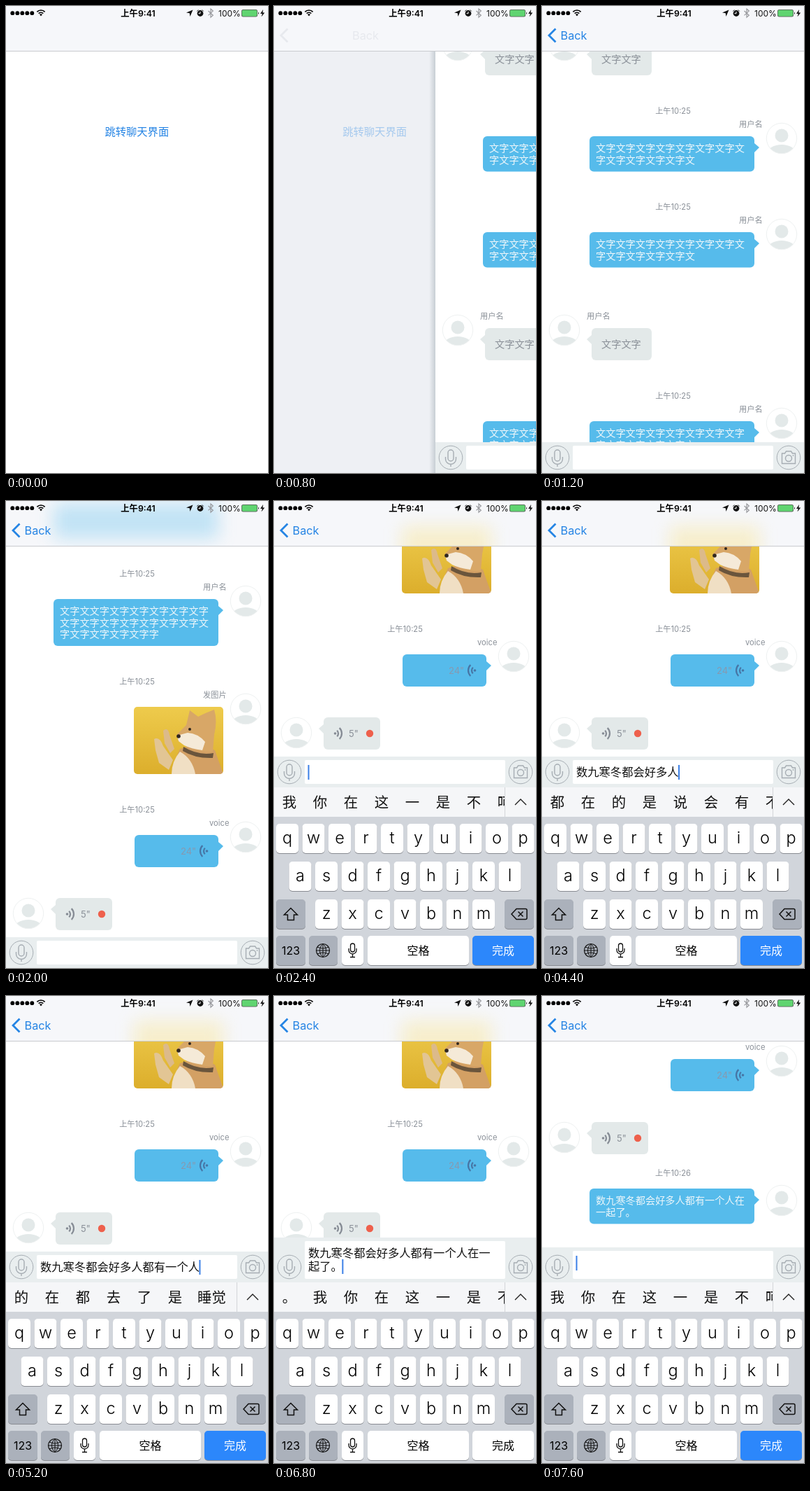
An HTML page with a canvas that plays this animation: 375x667 px, repeating every 8 s.

```html
<!DOCTYPE html>
<html lang="zh-CN">
<head>
<meta charset="utf-8">
<title>聊天界面</title>
<style>
html, body { margin: 0; width: 100%; height: 100%; overflow: hidden; background: #fff; }
canvas { display: block; width: 375px; height: 667px; }
</style>
</head>
<body>
<canvas id="stage"></canvas>
<script>
const W = 375, H = 667, NAV = 64, KEYBOARD_TOP = 409;
const STEP = 400, LOOP = 8000;
const FONT = 'Inter, "Noto Sans CJK SC", "Noto Sans CJK", sans-serif';
const BLUE = '#56bbeb', PALE = '#e3e9e9', GREY = '#8a9098', LINK = '#2584e4';

const canvas = document.getElementById('stage');
const ratio = window.devicePixelRatio || 1;
canvas.width = W * ratio;
canvas.height = H * ratio;
const c = canvas.getContext('2d');

// ---- drawing helpers ----
function scoped(draw) { c.save(); draw(); c.restore(); }

function rect(x, y, w, h, fill, r = 0) {
  c.fillStyle = fill;
  c.beginPath();
  c.roundRect(x, y, w, h, r);
  c.fill();
}

function clip(x, y, w, h, r = 0) {
  c.beginPath();
  c.roundRect(x, y, w, h, r);
  c.clip();
}

function dot(x, y, r, fill) {
  c.fillStyle = fill;
  c.beginPath();
  c.arc(x, y, r, 0, 7);
  c.fill();
}

function ring(x, y, r, color, width = 1) {
  c.strokeStyle = color;
  c.lineWidth = width;
  c.beginPath();
  c.arc(x, y, r, 0, 7);
  c.stroke();
}

function fillPath(d, color, x = 0, y = 0) {
  scoped(() => { c.translate(x, y); c.fillStyle = color; c.fill(new Path2D(d)); });
}

function strokePath(d, color, width, x = 0, y = 0) {
  scoped(() => {
    c.translate(x, y);
    c.strokeStyle = color;
    c.lineWidth = width;
    c.stroke(new Path2D(d));
  });
}

// y is the vertical middle of the line
function text(s, x, y, size, color, align = 'left', weight = 400) {
  c.font = `${weight} ${size}px ${FONT}`;
  c.textAlign = align;
  c.fillStyle = color;
  c.fillText(s, x, y + size * 0.37);
}

// ---- conversation ----
const TWO_LINES = ['文字文字文字文字文字文字文字文', '字文字文字文字文字文'];
const ROWS = [
  { y: 53, kind: 'them', name: '用户名' },
  { y: 186, kind: 'me', lines: TWO_LINES, name: '用户名' },
  { y: 323, kind: 'me', lines: TWO_LINES, name: '用户名' },
  { y: 460, kind: 'them', name: '用户名' },
  { y: 593, kind: 'me', lines: ['文文字文字文字文字文字文字文字', '字文字文字文字文字文'], name: '用户名' },
  { y: 730, kind: 'me', lines: ['文字文文字文字文字文字文字文字', '文字文字文字文字文字文字文字文', '字文字文字文字文字字'], name: '用户名' },
  { y: 884, kind: 'photo', name: '发图片' },
  { y: 1067, kind: 'myVoice', name: 'voice' },
  { y: 1157, kind: 'theirVoice' },
  { y: 1252, kind: 'me', lines: ['数九寒冬都会好多人都有一个人在', '一起了。'], sent: true }
];

function avatar(x, y) {
  scoped(() => {
    c.beginPath();
    c.arc(x, y, 22, 0, 7);
    c.clip();
    dot(x, y, 22, '#fff');
    dot(x, y - 4, 9.5, PALE);
    c.beginPath();
    c.ellipse(x, y + 21, 20, 12, 0, 0, 7);
    c.fill();
  });
  ring(x, y, 21.7, '#eef1f1');
}

function bubble(x, y, w, h, mine) {
  const color = mine ? BLUE : PALE;
  rect(x, y, w, h, color, 6);
  fillPath(mine ? 'M0 10L7 16 0 23z' : 'M0 10L-7 16 0 23z', color, mine ? x + w : x, y);
}

function soundWaves(x, y, direction, color) {
  scoped(() => {
    c.translate(x, y);
    c.scale(direction, 1);
    dot(1.5, 0, 1.8, color);
    c.strokeStyle = color;
    c.lineWidth = 2.2;
    for (const r of [6, 11]) {
      c.beginPath();
      c.arc(0, 0, r, -0.8, 0.8);
      c.stroke();
    }
  });
}

function dogPhoto(x, y) {
  scoped(() => {
    clip(x, y, 128, 96, 5);
    c.translate(x, y);
    const field = c.createLinearGradient(0, 0, 0, 96);
    field.addColorStop(0, '#eecb4c');
    field.addColorStop(1, '#dcae2c');
    rect(0, 0, 128, 96, field);
    fillPath('M66 60Q92 50 116 62L128 96H56Q58 76 66 60z', '#d3a064');
    fillPath('M66 64Q84 74 88 96H54Q54 78 66 64z', '#f0dfc4');
    fillPath('M42 34Q49 28 51 40L58 60 52 66 44 52z', '#dcba8a');
    fillPath('M29 46Q37 42 42 56L56 76 50 90 36 80 31 62z', '#e2c594');
    fillPath('M62 39L75 26 80 5 92 14Q104 8 115 4Q120 20 115 40L113 64Q92 66 73 55L64 49z', '#d8a767');
    fillPath('M62 41L77 37Q92 38 102 50L98 62Q82 60 72 55L64 49z', '#f5ead8');
    fillPath('M71 57Q92 70 114 66L113 73Q88 74 70 63z', '#6a553c');
    dot(64, 42, 2.8, '#30261f');
    dot(80, 32, 2, '#30261f');
  });
}

function drawRow(row, y) {
  const mine = row.kind !== 'them' && row.kind !== 'theirVoice';
  const avatarY = row.sent ? y + 17 : mine || row.name ? y + 3 : y + 22;
  avatar(mine ? 343 : 32, avatarY);
  if (mine) text(row.sent ? '上午10:26' : '上午10:25', 187.5, y - (row.sent ? 22 : 36), 11.2, GREY, 'center');
  if (row.name) text(row.name, !mine ? 64 : row.name === 'voice' ? 291 : 282, y - 17, 11.2, GREY);

  if (row.kind === 'them') {
    bubble(71, y, 86, 46, false);
    text('文字文字', 85, y + 23, 14.2, GREY);
  } else if (row.kind === 'me') {
    bubble(68, y, 236, 17 + 16.7 * row.lines.length, true);
    row.lines.forEach((line, i) => text(line, 77, y + 17 + 16.6 * i, 14.2, '#edf6fa'));
  } else if (row.kind === 'photo') {
    dogPhoto(183, y);
  } else if (row.kind === 'myVoice') {
    bubble(184, y, 120, 46, true);
    text('24"', 250, y + 23, 13, '#8699b0');
    soundWaves(289, y + 23, -1, '#4775a5');
  } else {
    bubble(71, y, 81, 46, false);
    soundWaves(86, y + 23, 1, '#858b94');
    text('5"', 107, y + 23, 13, GREY);
    dot(137, y + 23, 5.2, '#ee604c');
  }
}

function drawMessages(scroll, showSent) {
  for (const row of ROWS) {
    const y = row.y - scroll;
    if ((!row.sent || showSent) && y > -130 && y < H + 40) drawRow(row, y);
  }
}

// ---- input bar ----
function drawInputBar(top, bottom, value, composing, cursor) {
  const line = '#a6adb3', mid = bottom - 22;
  rect(0, top, W, bottom - top, '#e9eeef');
  rect(44, top + 5, 287, bottom - top - 10, '#fff', 2);
  ring(22, mid, 16.8, line);
  strokePath('M-4 -7a4 4 0 0 1 8 0v8a4 4 0 0 1-8 0zM-7.5 -1v3a7.5 7.5 0 0 0 15 0v-3M0 9.5v3.5', line, 1.4, 22, mid);
  ring(353, mid, 16.8, line);
  strokePath('M-9.5 -6h4l2-3h7l2 3h4v14.5h-19z', line, 1.4, 353, mid);
  ring(353, mid + 1, 4.5, line, 1.4);
  dot(359.5, mid - 3, 0.9, line);

  const lines = value.match(/.{1,16}/g) || [''];
  let endX = 49, y = top + 22;
  c.letterSpacing = composing ? '1.8px' : '0px';
  lines.forEach((s, i) => {
    y = top + 22 + 19 * i;
    c.font = `400 16.3px ${FONT}`;
    const width = c.measureText(s).width;
    if (composing) rect(49, y - 9, width, 19, '#cbd2da');
    text(s, 49, y, 16.3, '#111');
    endX = 49 + width;
  });
  c.letterSpacing = '0px';
  if (cursor) rect(endX - 0.5, y - 10, 2, 21, '#3b7fe6');
}

// ---- keyboard ----
function key(x, y, w, label, { size = 16, fill = '#fff', color = '#000', weight = 400, lift = 0 } = {}) {
  rect(x, y + 1, w, 42, '#898c92', 5);
  rect(x, y, w, 42, fill, 5);
  text(label, x + w / 2, y + 21 - lift, size, color, 'center', weight);
}

function drawCandidates(words) {
  rect(0, KEYBOARD_TOP, W, 42, '#f5f6f8');
  scoped(() => {
    clip(0, KEYBOARD_TOP, 330, 42);
    let x = 0;
    for (const word of words) {
      const cell = Math.max(44, word.length * 20.4 + 20);
      text(word, x + cell / 2, 430.3, 20.4, '#111', 'center');
      x += cell;
    }
  });
  rect(330, KEYBOARD_TOP, 1, 42, '#d3d5d9');
  strokePath('M345 434l8-8 8 8', '#222', 1.4);
}

function drawKeyboard(words, composing, pressed) {
  const dark = { fill: '#abb1bb' };
  const letterStyle = { size: 23.5, weight: 300, lift: 1.4 };
  rect(0, KEYBOARD_TOP, W, H - KEYBOARD_TOP, '#d1d5db');
  drawCandidates(words);
  [['qwertyuiop', 3, 461], ['asdfghjkl', 21.5, 515], ['zxcvbnm', 59, 569]].forEach(([letters, x, y]) =>
    [...letters].forEach((letter, i) => key(x + 37.5 * i, y, 32, letter, letterStyle)));

  key(3, 569, 42, '', dark);
  strokePath('M24 581.5l9.5 9.5h-5v7.5h-9v-7.5h-5z', '#111', 1.5);
  key(330, 569, 42, '', dark);
  strokePath('M340 590l7-7.5h13q2 0 2 2v11q0 2-2 2h-13zM349.5 586.5l7 7m0-7l-7 7', '#111', 1.5);

  key(3, 621, 42, '123', dark);
  key(50, 621, 41, '', dark);
  ring(70, 642, 9.5, '#111', 1.2);
  strokePath('M-9.5 0h19M0 -9.5v19M-8 -5q8 4 16 0M-8 5q8-4 16 0M0 -9.5c-6 5-6 14 0 19c6-5 6-14 0-19', '#111', 1, 70, 642);
  key(97, 621, 31, '');
  strokePath('M109.5 635a3 3 0 0 1 6 0v6a3 3 0 0 1-6 0z', '#111', 1.3);
  strokePath('M107 639v2.5a5.5 5.5 0 0 0 11 0v-2.5M112.5 647v4M109 651.5h7', '#111', 1.3);
  key(134, 621, 145, composing ? '选定' : '空格');
  if (composing) key(284, 621, 88, '确认', dark);
  else key(284, 621, 88, '完成', pressed ? {} : { fill: '#2c87fb', color: '#fff' });
}

// ---- bars at the top ----
function drawStatusBar() {
  for (let i = 0; i < 5; i++) dot(9.3 + 7 * i, 10.2, 2.9, '#000');
  c.strokeStyle = '#000';
  c.lineWidth = 1.7;
  for (const r of [4.7, 8]) {
    c.beginPath();
    c.arc(50, 14, r, -2.35, -0.79);
    c.stroke();
  }
  fillPath('M50 14.5l-2-2.4q2-1.5 4 0z', '#000');
  text('上午9:41', 189, 10.3, 12.3, '#000', 'center', 600);
  fillPath('M267.5 5.5l-4 9.5-.8-4.7-4.7-.8z', '#111');
  dot(278, 10.5, 4.4, '#111');
  strokePath('M278 8v2.7h-2.5', '#fff', 1);
  strokePath('M273.3 7.5l2-2M282.7 7.5l-2-2', '#111', 1);
  strokePath('M289.5 7l6.8 6.3-3.3 2.9v-12l3.3 2.9-6.8 6.3', '#98999d', 1.2);
  text('100%', 304, 10.3, 12, '#111');
  rect(337, 5, 23, 10.5, '#555', 2.5);
  rect(337.7, 5.7, 21.6, 9.1, '#5fd470', 2);
  fillPath('M361 8.5q2 1.8 0 3.5z', '#111');
  fillPath('M368 5l-4 6h2.7l-1.2 4.5 4.7-6h-2.8z', '#111');
}

// content showing softly through the translucent bar
function drawNavGlow(scroll) {
  const glow = (x, y, w, h, color) => {
    if (y < 80 && y + h > 10) rect(x, y, w, h, color, 6);
  };
  scoped(() => {
    clip(0, 0, W, NAV);
    c.filter = `blur(${12 * ratio}px)`;
    c.globalAlpha = 0.32;
    for (const row of ROWS) {
      const y = row.y - scroll;
      if (row.kind === 'me') glow(68, y, 236, 17 + 16.7 * row.lines.length, BLUE);
      if (row.kind === 'photo') glow(183, y, 128, 96, '#f8de6c');
      if (row.kind === 'myVoice') glow(184, y, 120, 46, BLUE);
    }
  });
}

function drawNav(scroll, hasBack, backX, color) {
  rect(0, 0, W, NAV, '#f6f7fa');
  if (scroll !== null) drawNavGlow(scroll);
  rect(0, NAV, W, 1, '#c9cbcf');
  if (hasBack) {
    strokePath('M19.5 32.5l-9.5 9.5 9.5 9.5', color, 2.8);
    text('Back', backX, 42.3, 16.3, color);
  }
  drawStatusBar();
}

// ---- timeline ----
const SENTENCE = '数九寒冬都会好多人都有一个人在一起了。';
const COMMON = [...'我你在这一是不呵'];
const TYPING = [
  ['', COMMON],
  ['sj', ['时间', '世界', '手机', '数据', '设计']],
  ['sjhdd', ['实践活动', '手机', '世界', '时间']],
  ['sjhddhhd', ['数九寒冬都会好多', '实践活动', '社交活动']],
  [SENTENCE.slice(0, 8), [...'的人了次年事钱样']],
  [SENTENCE.slice(0, 9), [...'都在的是说会有不']],
  [SENTENCE.slice(0, 13), [...'人月小的字家多好']],
  [SENTENCE.slice(0, 14), [...'的在都去了是', '睡觉']],
  [SENTENCE.slice(0, 15), ['家', '一起', '那', '这', '外面', '哪里', '家里']],
  [SENTENCE.slice(0, 17), [...'的了吧吃玩过就来']],
  [SENTENCE.slice(0, 18), [...'。，吗吧！？就啊']],
  [SENTENCE, [...'。我你在这一是不']],
  ['', COMMON],
  ['', COMMON]
];

function drawHome() {
  text('跳转聊天界面', 187.3, 179, 15.3, LINK, 'center');
}

function drawPush() {
  const edge = 231;
  rect(0, 0, edge, H, '#eef0f4');
  scoped(() => {
    c.translate(-43.2, 0);
    c.globalAlpha = 0.36;
    drawHome();
  });
  const shade = c.createLinearGradient(edge - 9, 0, edge, 0);
  shade.addColorStop(0, 'rgba(190,198,204,0)');
  shade.addColorStop(1, 'rgba(190,198,204,.8)');
  rect(edge - 9, NAV, 9, H - NAV, shade);
  scoped(() => {
    c.translate(edge, 0);
    rect(0, 0, W, H, '#fff');
    drawMessages(0, false);
    drawInputBar(623, H, '', false, false);
  });
  drawNav(null, true, 112, '#e7e9ee');
}

function drawChat(step) {
  const typing = step >= 6;
  const [value, words] = typing ? TYPING[step - 6] : ['', []];
  const composing = /[a-z]/.test(value);
  const sent = step >= 18;
  const scroll = step < 4 ? 0 : step < 6 ? 590 : { 18: 910, 19: 977 }[step] || 848;
  const bottom = typing ? KEYBOARD_TOP : H;
  const barHeight = value.length > 16 ? 64 : { 18: 59, 19: 50 }[step] || 44;

  drawMessages(scroll, sent);
  drawInputBar(bottom - barHeight, bottom, value, composing, typing);
  if (typing) drawKeyboard(words, composing, step === 17);
  drawNav(scroll, true, 26.5, LINK);
}

function frame(now) {
  const step = Math.floor((now % LOOP) / STEP);
  c.setTransform(ratio, 0, 0, ratio, 0, 0);
  rect(0, 0, W, H, '#fff');
  if (step < 2) {
    drawHome();
    drawNav(null, false);
  } else if (step === 2) {
    drawPush();
  } else {
    drawChat(step);
  }
  requestAnimationFrame(frame);
}
requestAnimationFrame(frame);
</script>
</body>
</html>
```
